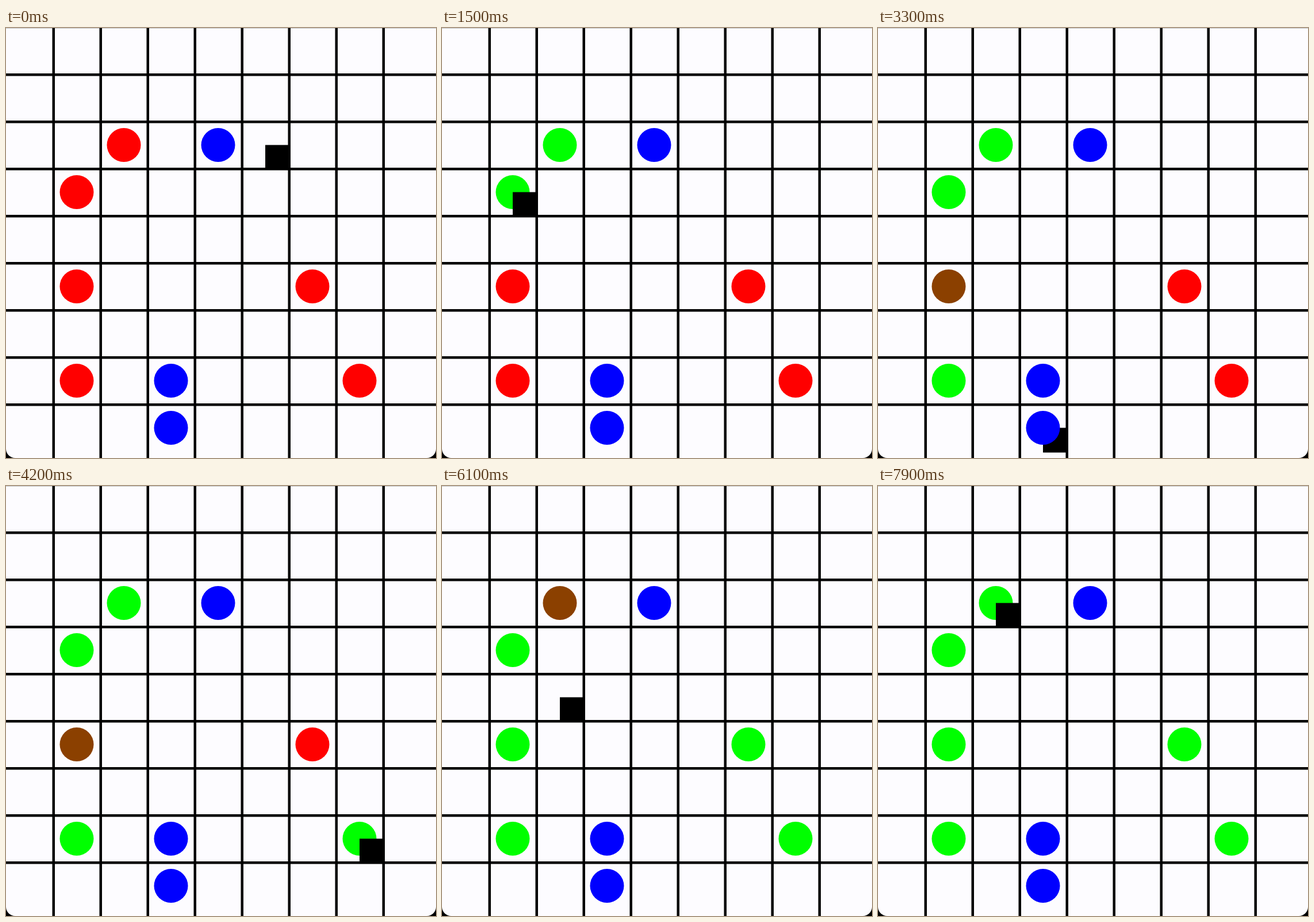
An HTML page with a canvas for the animation above (8000 ms loop, 748 px wide and 748 px high).

```html
<!DOCTYPE html>
<html>
<head>
<meta charset="utf-8">
<style>
html, body { margin: 0; width: 100%; height: 100%; overflow: hidden; background: #000; }
canvas { display: block; }
</style>
</head>
<body>
<canvas id="board" width="748" height="748"></canvas>
<script>
const ctx = document.getElementById('board').getContext('2d');
const SIZE = 748, CELL = 82, LINE = 4.5, LOOP = 8000, TICK = 100, STEP = 250, DELAY = 100;

// Each cell is written as column then row.
const path = ('52 42 32 22 12 13 14 15 16 17 27 37 38 48 58 68 77 ' +
  '66 65 55 45 35 25 15 24 23 22').split(' ');
const trees = ['22', '13', '15', '65', '17', '77'];
const ponds = ['42', '37', '38'];
const wiltStep = { 15: 11, 22: 22 };

const center = ([col, row]) => [41 + CELL * col, 39.5 + CELL * row];

function disc(cell, color) {
  const [x, y] = center(cell);
  ctx.fillStyle = color;
  ctx.beginPath();
  ctx.arc(x, y, 29.5, 0, 2 * Math.PI);
  ctx.fill();
}

function treeColor(cell, step) {
  const visit = path.lastIndexOf(cell, step);
  if (visit < 0) return '#f00';
  const wilt = wiltStep[cell];
  return wilt <= step && visit < wilt ? '#8b4000' : '#0f0';
}

function drawBoard() {
  ctx.fillStyle = '#000';
  ctx.fillRect(0, 0, SIZE, SIZE);
  ctx.fillStyle = '#fdfcff';
  ctx.beginPath();
  ctx.roundRect(0, 0, SIZE, SIZE, [0, 0, 16, 16]);
  ctx.fill();
  ctx.fillStyle = '#c4c4c6';
  ctx.fillRect(0, 0, SIZE, 1);
  ctx.fillStyle = '#000';
  for (let i = 1; i < 9; i++) {
    ctx.fillRect(CELL * i - 1.5, 0, LINE, SIZE);
    ctx.fillRect(0, CELL * i - 3, SIZE, LINE);
  }
}

function draw(now) {
  const time = Math.floor((now % LOOP) / TICK) * TICK;
  const step = Math.min(path.length - 1, Math.max(0, Math.floor((time - DELAY) / STEP)));
  drawBoard();
  trees.forEach(cell => disc(cell, treeColor(cell, step)));
  const [x, y] = center(path[step]);
  ctx.fillStyle = '#000';
  ctx.fillRect(x, y, 43, 43);
  ponds.forEach(cell => disc(cell, '#00f'));
}

const start = performance.now();
function frame() {
  draw(performance.now() - start);
  requestAnimationFrame(frame);
}
frame();
</script>
</body>
</html>
```
